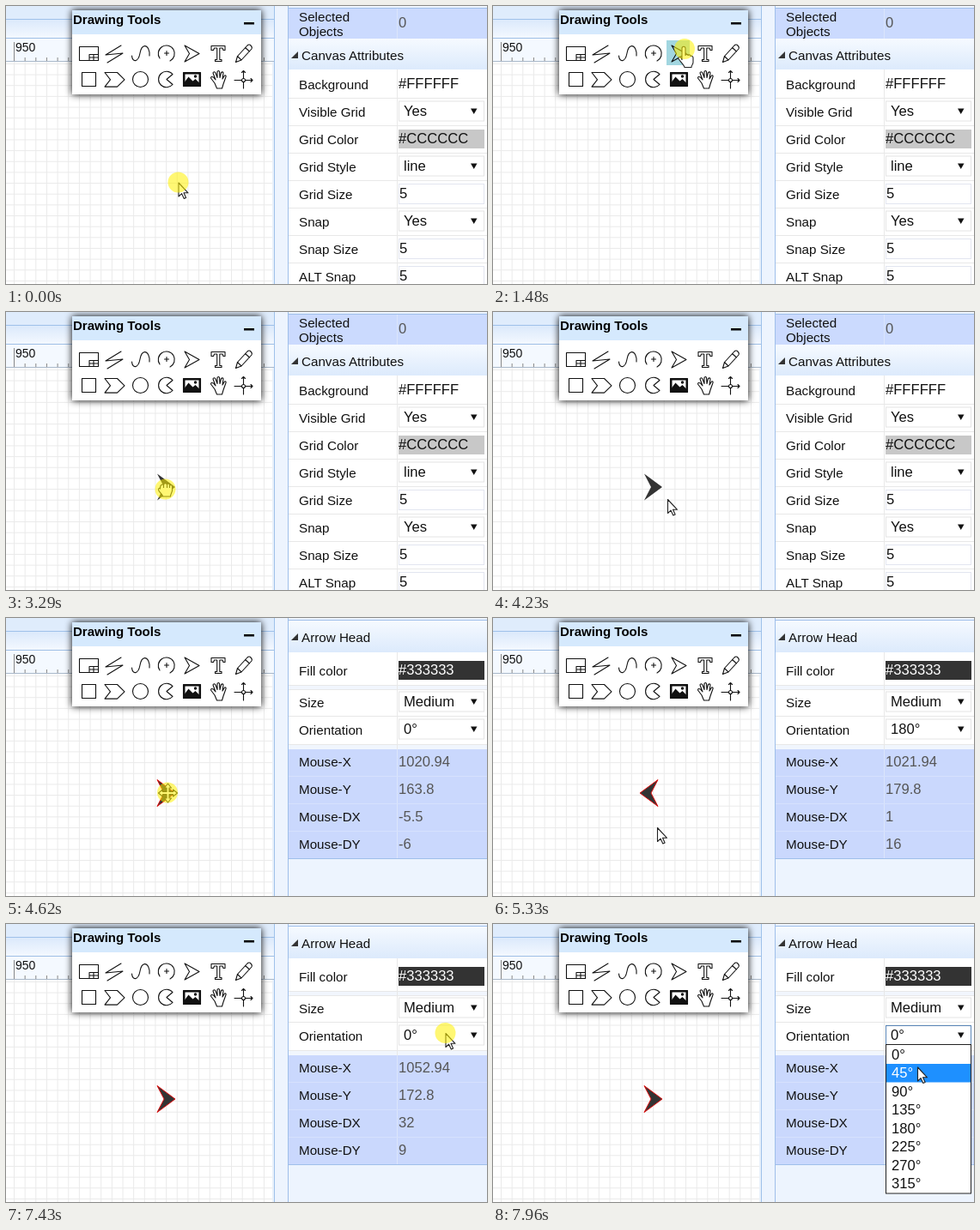
An HTML page that plays this animation: 560 by 324 pixels, repeating every 8000 ms.

```html
<!DOCTYPE html>
<html lang="en">
<head>
<meta charset="utf-8">
<title>Drawing tools</title>
<style>
html, body { margin: 0; width: 100%; height: 100%; overflow: hidden; background: #edf4fe; }
svg { display: block; width: 560px; height: 324px; font-family: Arial, "Liberation Sans", sans-serif; }
.label { font-size: 15.2px; fill: #111; }
.value { font-size: 16.6px; fill: #111; }
.title { font-size: 15px; font-weight: bold; }
.dim { fill: #555; }
.icon { fill: none; stroke: #111; stroke-width: 1.1; stroke-linejoin: round; stroke-linecap: round; }
.cursor { fill: #fff; stroke: #222; stroke-width: 1.1; stroke-linejoin: round; }
#toolbar { filter: drop-shadow(0 0 4px #000); }
</style>
</head>
<body>
<svg id="stage" viewBox="0 0 560 324" xmlns="http://www.w3.org/2000/svg"></svg>
<script>
const LOOP = 8000;
const UNIT = 2.53, GRID = 5 * UNIT;
const ORIGIN = { x: 9.5, y: 67.4 };
const COLUMNS = [96.5, 126.5, 156.5, 187, 216, 247, 276.5];
const ROWS = [55.5, 85.5];
const ANGLES = [0, 45, 90, 135, 180, 225, 270, 315];
const OPTION_TOP = 141.5, OPTION_HEIGHT = 21.5;

// start, end, steps, control x, control y, end x, end y
const MOVES = [
  [590, 830, 4, 283, 90, 233, 39],
  [1000, 1480, 7, 229, 42, 223, 50],
  [1630, 2110, 7, 222, 130, 185.5, 206.5],
  [3590, 3920, 5, 194, 210, 203, 218],
  [4380, 4620, 4, 196, 212, 188, 203.5],
  [4780, 4930, 3, 191, 218, 191, 244],
  [5940, 5940, 1, 191, 245, 191, 245],
  [6410, 6410, 1, 191, 246, 191, 246],
  [6960, 7430, 7, 330, 200, 511.5, 127],
  [7740, 7960, 4, 506, 150, 494, 166.5]
];
const NO_HALO = [[2570, 3290], [3440, 3590], [4230, 4380], [4930, 6960], [7740, 8000]];
const TURNS = [[0, 0], [5080, 90], [5330, 180], [5630, 270], [6090, 0]];
// time, mouse x, y, dx, dy
const READINGS = [
  [0, 1020.94, 163.8, -5.5, -6],
  [4780, 1021.94, 168.3, 1, 4.5],
  [4855, 1021.94, 174.3, 1, 10.5],
  [4930, 1021.94, 179.8, 1, 16],
  [5940, 1021.94, 180.3, 1, 16.5],
  [6410, 1021.94, 180.8, 1, 17],
  [6960, 1037.94, 176.8, 17, 13],
  [7040, 1052.94, 172.8, 32, 9]
];

const rect = (x, y, w, h, fill, more = "") =>
  `<rect x="${x}" y="${y}" width="${w}" height="${h}" fill="${fill}" ${more}/>`;
const text = (x, y, str, cls = "label", more = "") =>
  `<text x="${x}" y="${y}" class="${cls}" ${more}>${str}</text>`;
const path = (d, more = "") => `<path d="${d}" ${more}/>`;
const hline = (y, color = "#e8e8e8") => rect(329, y, 231, 1, color);
const label = (mid, str) => text(341, mid + 5, str);
const frame = (mid, color) => rect(457.5, mid - 11.5, 99, 23, "#fff", `stroke="${color}"`);

function select(mid, str, id = "") {
  return frame(mid, "#e4e4e4") +
    text(463, mid + 5.5, str, "value", id && `id="${id}"`) +
    path(`M541 ${mid - 3}h7.500l-3.750 6.500z`, 'fill="#111"');
}

function input(mid, str) {
  return frame(mid, "#e2e5f0") + text(458, mid + 4.5, str, "value");
}

function swatch(mid, str, fill, ink) {
  return rect(457, mid - 11, 100, 22, fill) +
    text(457, mid + 5, str, "value", `style="fill:${ink}"`);
}

function heading(top, height, mid, str) {
  return rect(329, top, 231, height, "url(#head)") +
    path(`M340 ${mid - 5}v8h-8z`, 'fill="#333"') + text(344, mid + 5, str);
}

function canvasArea() {
  let out = rect(0, 0, 313, 15, "#dfecfc") + rect(0, 15, 313, 1, "#9fc1ea") +
    rect(0, 16, 313, 21, "url(#band)") + rect(0, 37, 312, 1, "#9fbfe6") +
    rect(0, 38, 312, 27, "#f4f9ff") + rect(0, 65, 310, 259, "#fff");
  let grid = "", ticks = "";
  for (let x = ORIGIN.x, i = 0; x < 310; x += GRID, i++) {
    grid += `M${x} 65V324`;
    ticks += `M${x} 64V${i % 10 ? 60 : 42}`;
  }
  for (let y = ORIGIN.y; y < 324; y += GRID) grid += `M0 ${y}H310`;
  out += path(grid, 'stroke="#eaeaea"') + path(ticks, 'stroke="#888"');
  out += rect(0, 64, 312, 1, "#a9b8ca") + text(11, 53, "950", "label", 'style="font-size:14px"');
  return out + rect(310, 65, 2, 259, "#e8f0fb") + rect(312, 0, 1, 324, "#9fc1ea");
}

function toolbar() {
  const shapes = [
    "M85.500 47.500h22v16h-22zM97 63.500v-7h10.500M97 60h10.500M102 56.500v7",
    "M134 46L116 57L136 55L118 66",
    "M146.500 58C147 66 154 66 156 55S165 44 167 54V58",
    "M179 61A9.500 9.500 0 1 1 191 64M187 52.500v5M184.500 55h5",
    "M208 46L225 55.500L208 65L213.500 55.500Z",
    "M239 46.500h16v5h-2l-1-2.500h-3.200v13.500h2.200v2h-7.500v-2h2.200v-13.500h-3.200l-1 2.500h-2.500z",
    "M267.500 65.500l2-7L281 46q2-2 4 0t1 4L274 63zM269.500 58.500l4.500 4.500M278.500 48.500l5 4.500",
    "M88.500 77.500h16v16h-16z",
    "M115 77.500h14.500l8.500 8.300l-8.500 8.300H115l6.500-8.300z",
    "M147.500 85.500a9 9 0 1 0 18 0a9 9 0 1 0-18 0z",
    "M187 85.500L194 79.500A9.300 9.300 0 1 0 194 91.500Z",
    "M206.500 77.500h20v16h-20z",
    "M243 90l-4.500-6q0-2.500 3-1l2.500 3L241 78q1-2.500 3 0l2 5.500V76.500q1.500-2 2.500 0l.5 7l1.500-6q2-1.500 2.500.5l-1 7l2.500-4q2-.5 1.500 1.500L253 91l-1.500 5h-6z",
    "M266 86.500h8.500M278.500 86.500h8.500M285 84.500l2 2l-2 2M276.500 96v-7.500M276.500 84.500V75.500M274.500 77.500l2-2l2 2M274.500 86.500a2 2 0 1 0 4 0a2 2 0 1 0-4 0"
  ];
  return rect(77, 5, 220, 98, "#fff") + rect(77, 5, 220, 28, "#d5e9fd") +
    text(78, 21, "Drawing Tools", "title") +
    rect(277, 19, 12, 2.5, "#000") +
    rect(0, 0, 27, 29, "#a2d6e0", 'id="hover"') +
    `<g class="icon">${shapes.map(d => path(d)).join("")}</g>` +
    rect(207.5, 78.5, 18, 14, "#fff", 'stroke="#111" stroke-width="2"') +
    path("M208 92V88.500l4.500-6l5 5l3-2.500l4.500 4.500v2.500z", 'fill="#111"') +
    '<circle cx="220.500" cy="82" r="1.700" fill="#111"/>';
}

function canvasPanel() {
  let out = rect(329, 2, 231, 322, "#fff") + rect(329, 2, 231, 36, "#cbdafe") +
    hline(2, "#9fbfea") + label(13, "Selected") + label(30, "Objects") +
    text(457, 25, "0", "value dim") + heading(38, 36, 58, "Canvas Attributes");
  const names = ["Background", "Visible Grid", "Grid Color", "Grid Style", "Grid Size", "Snap", "Snap Size", "ALT Snap"];
  names.forEach((name, i) => {
    out += label(92 + 32 * i, name) + hline(107 + 32 * i);
  });
  out += rect(455, 74, 1, 250, "#e8e8e8") + rect(455, 3, 1, 35, "#dbe5fb");
  return out + text(457, 96, "#FFFFFF", "value") + select(122.5, "Yes") +
    swatch(155, "#CCCCCC", "#c8c8c8", "#111") + select(186.5, "line") + input(219, "5") +
    select(250.5, "Yes") + input(283, "5") + input(315, "5");
}

function arrowPanel() {
  let out = rect(329, 2, 231, 279, "#fff") + heading(2, 38, 23, "Arrow Head") +
    hline(2, "#9fbfea") +
    label(62, "Fill color") + label(99, "Size") + label(131, "Orientation") +
    hline(78) + hline(83) + hline(114) + hline(147) +
    rect(329, 79, 231, 4, "#f1f6fd") + rect(329, 148, 231, 5, "#f1f6fd") +
    rect(455, 40, 1, 113, "#e8e8e8") + rect(329, 153, 231, 128, "#cad8fd") +
    rect(455, 153, 1, 128, "#dbe5fb");
  ["X", "Y", "DX", "DY"].forEach((name, i) => {
    const mid = 168 + 32 * i;
    out += label(mid, "Mouse-" + name) + text(457, mid + 4.5, "", "value dim", 'data-reading=""');
    if (i) out += hline(mid - 16, "#d6e1fd");
  });
  return out + hline(280, "#9fbfea") + swatch(61, "#333333", "#333", "#fff") +
    select(97.5, "Medium") + select(129.5, "", "angle");
}

function dropdown() {
  let out = rect(457.5, 118.5, 99, 22, "none", 'stroke="#5a86b8"') +
    rect(457.5, 140.5, 99, 173.5, "#fff", 'stroke="#222"') +
    rect(458, 0, 98, OPTION_HEIGHT, "#1e90ff", 'id="mark"');
  ANGLES.forEach((a, i) => {
    out += text(464, OPTION_TOP + OPTION_HEIGHT * i + 16, a + "°", "value", 'data-option=""');
  });
  return out;
}

const CURSORS = {
  arrow: "M0 0V16L3.600 12.700L6.300 18.500L8.600 17.500L6 11.800H11Z",
  hand: "M-3.500-1c0-3 4-3 4 0v8c1-2 3-1 3 0c1-1 3-1 3 1c1-1 3 0 3 2v5c0 3-2 3-2 6h-8c0-2-6-8-7-10c-1-2 2-3 3-1l1 2z",
  grab: "M-6.500-2c0-4 3-5 4-3c0-3 3-3 4-1c1-2 3-1 3 1c2-1 3 0 3 2v4c0 2-2 4-2 7h-9c0-3-5-5-5-8c0-2 2-2 2-1zM-2.500-5v3M1.500-6v4M4.500-5v3",
  move: "M0-11L4-6H1.500V-1.500H6V-4L11 0L6 4V1.500H1.500V6H4L0 11L-4 6H-1.500V1.500H-6V4L-11 0L-6-4V-1.500H-1.500V-6H-4Z"
};

const gradient = (id, from, to) =>
  `<linearGradient id="${id}" x2="0" y2="1"><stop stop-color="${from}"/><stop offset="1" stop-color="${to}"/></linearGradient>`;

const stage = document.getElementById("stage");
stage.innerHTML =
  `<defs>${gradient("head", "#f6faff", "#dceafc")}${gradient("band", "#dbe9fb", "#f3f8ff")}</defs>` +
  rect(0, 0, 560, 324, "#edf4fe") + canvasArea() +
  path("M176 188.500L197 204L176 219.500L184 204Z", 'id="head-shape" fill="#333"') +
  path("", 'id="guides" stroke="#777"') +
  rect(328, 0, 1, 324, "#9fbfea") +
  `<g id="canvas-panel">${canvasPanel()}</g><g id="arrow-panel">${arrowPanel()}</g>` +
  `<g id="toolbar">${toolbar()}</g><g id="dropdown">${dropdown()}</g>` +
  path("", 'id="cursor" class="cursor"') +
  '<circle id="halo" r="12" fill="#fff000" opacity=".55"/>';

const $ = id => document.getElementById(id);
const readings = [...stage.querySelectorAll("[data-reading]")];
const options = [...stage.querySelectorAll("[data-option]")];
const show = (el, on) => el.setAttribute("display", on ? "inline" : "none");
const set = (el, attrs) => { for (const k in attrs) el.setAttribute(k, attrs[k]); };
const latest = (list, t) => list.filter(item => item[0] <= t).pop();

function pointer(t) {
  let x = 200.5, y = 205.5;
  for (const [start, end, steps, cx, cy, ex, ey] of MOVES) {
    if (t < start) break;
    const gap = (end - start) / (steps - 1) || 1;
    const u = Math.min(1, (Math.floor((t - start) / gap + 0.05) + 1) / steps), v = 1 - u;
    x = v * v * x + 2 * u * v * cx + u * u * ex;
    y = v * v * y + 2 * u * v * cy + u * u * ey;
  }
  return { x, y };
}

function hoveredTool(p) {
  const cx = COLUMNS.find(c => Math.abs(p.x - c) < 14);
  const cy = ROWS.find(r => Math.abs(p.y - r) < 14.5);
  return cx && cy ? { x: cx - 14, y: cy - 15.5 } : null;
}

function draw(t) {
  const p = pointer(t);
  const selected = t >= 4620, open = t >= 7510;
  const tool = hoveredTool(p);
  const guided = t >= 1630 && t < 3290 && p.y > 104;

  show($("hover"), tool);
  if (tool) set($("hover"), tool);

  show($("guides"), guided);
  set($("guides"), { d: `M0 ${Math.round(p.y) + 0.5}H310M${Math.round(p.x) + 0.5} 65V324` });

  const angle = latest(TURNS, t)[1];
  show($("head-shape"), t >= 2740);
  set($("head-shape"), { transform: `rotate(${angle} 184 204)`, stroke: selected ? "#e01010" : "none" });

  show($("canvas-panel"), !selected);
  show($("arrow-panel"), selected);
  $("angle").textContent = angle + "°";
  const values = latest(READINGS, t);
  readings.forEach((el, i) => { el.textContent = values[i + 1]; });

  show($("dropdown"), open);
  const row = Math.max(0, Math.floor((p.y - OPTION_TOP) / OPTION_HEIGHT));
  set($("mark"), { y: OPTION_TOP + OPTION_HEIGHT * row });
  options.forEach((el, i) => { el.style.fill = open && i === row ? "#fff" : ""; });

  show($("halo"), !NO_HALO.some(([a, b]) => t >= a && t < b));
  set($("halo"), { cx: p.x, cy: p.y });

  let kind = "arrow";
  if (tool) kind = "hand";
  if (t >= 3290 && t < 3440) kind = "grab";
  if (t >= 4620 && t < 4780) kind = "move";
  show($("cursor"), !guided);
  set($("cursor"), { d: CURSORS[kind], transform: `translate(${p.x + 0.5} ${p.y + 0.5})` });
}

const begin = performance.now();
function tick() {
  draw((performance.now() - begin) % LOOP);
  requestAnimationFrame(tick);
}
tick();
</script>
</body>
</html>
```
